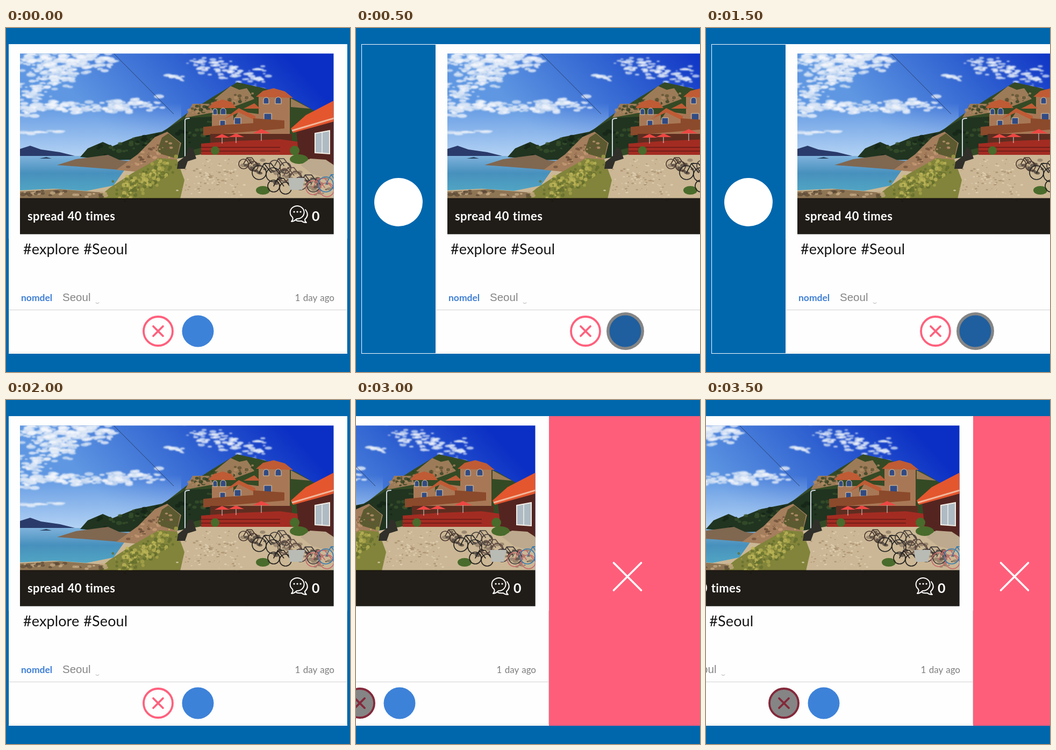
An HTML page for the animation above (4 s loop, 640 px wide and 640 px high).

```html
<!DOCTYPE html>
<html lang="en">
<head>
<meta charset="utf-8">
<style>
  html, body { margin: 0; width: 100%; height: 100%; overflow: hidden; background: #0067ad; }
  svg { display: block; width: 640px; height: 640px; }
  text { font-family: Lato, sans-serif; }
  .bold { font-weight: 700; }
  .line { fill: none; stroke-linecap: round; stroke-linejoin: round; }
</style>
</head>
<body>
<svg viewBox="0 0 640 640">
  <defs>
    <linearGradient id="sky" gradientUnits="userSpaceOnUse" x1="520" y1="50" x2="270" y2="280">
      <stop offset="0" stop-color="#0b2fc4"/>
      <stop offset=".5" stop-color="#3467d2"/>
      <stop offset="1" stop-color="#5f97e2"/>
    </linearGradient>
    <linearGradient id="haze" x2="0" y2="1">
      <stop offset="0" stop-color="#b4d3f4" stop-opacity="0"/>
      <stop offset="1" stop-color="#b4d3f4"/>
    </linearGradient>
    <linearGradient id="sea" x2="0" y2="1">
      <stop offset="0" stop-color="#7fb2dc"/>
      <stop offset=".4" stop-color="#4790bd"/>
      <stop offset="1" stop-color="#55aec6"/>
    </linearGradient>
    <clipPath id="frame"><rect x="26" y="47.5" width="583.5" height="336"/></clipPath>
    <filter id="soft"><feGaussianBlur stdDeviation="1.2"/></filter>
  </defs>

  <rect id="spreadPanel" x="10.5" y="30.5" height="575" fill="#0067ad" stroke="#fff"/>
  <circle id="spreadMark" cy="324" r="45" fill="#fff"/>

  <g id="card">
    <rect x="5" y="30" width="630" height="576" fill="#fdfefd"/>
    <g clip-path="url(#frame)">
      <rect x="26" y="47" width="584" height="337" fill="url(#sky)"/>
      <rect x="26" y="140" width="300" height="100" fill="url(#haze)"/>
      <g id="clouds" filter="url(#soft)"></g>
      <path d="M201 48L312 160" stroke="#26324e" stroke-width=".8"/>
      <path d="M26 240V225L45 219 65 226 100 231 132 239Z" fill="#2a3b6b"/>
      <rect x="26" y="238" width="230" height="80" fill="url(#sea)"/>
      <path d="M62 243L75 240 85 243Z" fill="#2c4560"/>
      <path d="M290 195L335 160 385 128 430 101 480 112 540 134 575 155V240H290Z" fill="#344a25"/>
      <path d="M333 167L347 141 378 141 386 157ZM388 132L418 108 434 115 448 112 462 132 425 146ZM530 131L566 150 530 147Z" fill="#9c7b58"/>
      <g id="hill"></g>
      <path d="M138 240L152 224 180 212 198 220 240 203 290 193 335 167 384 165V218L350 226 335 242 200 246Z" fill="#203420"/>
      <g id="trees"></g>
      <path d="M95 255L130 244 190 236 212 246 232 248 226 265 150 259Z" fill="#806750"/>
      <path d="M26 302L90 299 150 303 200 293 222 262 335 240 370 234 545 236 610 250V384H26Z" fill="#cbb795"/>
      <path d="M205 264L245 235 277 203 300 193 326 214 318 246 250 268Z" fill="#a57e5d"/>
      <path d="M280 232L290 204 302 196 324 214 318 243Z" fill="#5c5a30"/>
      <g id="cliff"></g>
      <path d="M26 304L100 300 180 306V318H26Z" fill="#8e7554"/>
      <path d="M168 318L192 298 235 270 285 242 318 245 332 283 324 318Z" fill="#81843a"/>
      <g id="grass"></g>
      <g id="gravel"></g>

      <path d="M383 160H423V172L433 155 470 160V128H528V215H383Z" fill="#a87856"/>
      <path d="M376 149L386 138 403 133 420 138 428 149ZM405 170L433 149 464 164 464 172 433 157ZM442 150L462 140 473 150ZM465 128L478 117 498 112 519 118 534 130Z" fill="#bf5b35"/>
      <g fill="#314b83" stroke="#dbc8ad" stroke-width="1">
        <path d="M385 161V154a4 4 0 0 1 8 0v7ZM399 161V154a5 5 0 0 1 10 0v7ZM479 141V134a5 5 0 0 1 10 0v7ZM501 141V134a5 5 0 0 1 11 0v7Z"/>
        <path d="M480 159h14v14h-14ZM425 167h12v12h-12ZM398 172h10v10h-10Z"/>
      </g>
      <path d="M367 184L410 180 460 177 460 168 518 172V187L367 200Z" fill="#8b4a2b"/>
      <path d="M380 197H532V216H380Z" fill="#5e2d20"/>
      <path d="M363 215L430 210 510 207 546 212V236H363Z" fill="#a32c22"/>
      <path d="M363 222H510M363 229H510" stroke="#651b18" stroke-width="1.5"/>
      <path d="M388 204L402 197 416 204ZM414 203L428 196 443 203ZM459 196L475 188 492 196Z" fill="#ed4743"/>
      <path d="M402 204V215M428 203V214M475 196V210" stroke="#ddd" stroke-width="1"/>
      <path d="M540 190L610 170V256L545 240Z" fill="#542520"/>
      <path d="M530 187L558 162 610 135V174L534 195Z" fill="#e4562e"/>
      <path d="M532 191L610 168" stroke="#f1b79b" stroke-width="3"/>
      <path d="M575 196L602 191V234L575 232Z" fill="#aebbc4" stroke="#f4eee6" stroke-width="2"/>
      <path d="M588 193V233" stroke="#f4eee6" stroke-width="1.5"/>
      <g fill="#496b2b">
        <circle cx="389" cy="228" r="8"/><circle cx="537" cy="228" r="9"/>
        <ellipse cx="545" cy="244" rx="17" ry="9"/><ellipse cx="478" cy="302" rx="13" ry="8"/>
      </g>
      <path d="M548 255L566 243 595 245 610 255V282L570 272Z" fill="#bda98d"/>
      <g id="bikes" class="line" stroke-width="1.7"></g>
      <path d="M525 279H556L551 301H528Z" fill="#b9bbb5"/>
      <path d="M333 238V172q0-4 8-4" class="line" stroke="#cfd8df" stroke-width="2"/>
      <path d="M318 262L320 249 334 238 340 222 348 224 354 243 338 248 333 262Z" fill="#302f2a"/>
      <rect x="26" y="316.5" width="584" height="68" fill="#0c0a08" fill-opacity=".89"/>
    </g>

    <g fill="#fff" class="bold">
      <text x="40" y="358" font-size="22" letter-spacing=".4" word-spacing="1">spread 40 times</text>
      <text x="569" y="359" font-size="25">0</text>
    </g>
    <g class="line" stroke="#fff" stroke-width="2">
      <path d="M533 352a13 12 0 1 1 8 3q-5 5-10 5q4-4 2-8Z"/>
      <path d="M557 338q8 10-1 18q0 4 3 6q-6 0-9-3q-6 1-10-1"/>
      <path d="M536 342h.1M542 342h.1M548 342h.1" stroke-width="3.2"/>
    </g>

    <text x="32" y="421" font-size="27" letter-spacing=".1" word-spacing="1" fill="#151515">#explore #Seoul</text>
    <text x="28" y="508" font-size="17.5" class="bold" fill="#3f7fd6">nomdel</text>
    <text x="105" y="508" font-size="20.5" fill="#858585" style="font-family:'Liberation Sans',sans-serif">Seoul</text>
    <path d="M167 511q3 3 6 0" class="line" stroke="#aaa"/>
    <text x="611" y="508" font-size="17" word-spacing="1" text-anchor="end" fill="#7d7d7d">1 day ago</text>
    <path d="M5 524.5H635" stroke="#d0d2d2"/>
    <path d="M5 603.5H635" stroke="#e4e6e6"/>
    <path d="M5.5 392V604M634.5 392V604" stroke="#d5d9dc"/>

    <g id="close" class="line" stroke-width="3.8">
      <circle cx="283" cy="564" r="27"/>
      <path d="M274 555l18 18m0-18l-18 18"/>
    </g>
    <circle id="shade" cx="357" cy="564" r="35" fill="#858585"/>
    <circle id="spread" cx="357" cy="564" r="29.5"/>
  </g>

  <rect id="closePanel" y="30" height="576" fill="#ff5e7a"/>
  <path id="closeMark" d="M-25.5-25.5l51 51m0-51l-51 51" class="line" stroke="#fff" stroke-width="3.6"/>
</svg>
<script>
const $ = id => document.getElementById(id);

function add(parent, tag, attributes) {
  const node = document.createElementNS("http://www.w3.org/2000/svg", tag);
  for (const name in attributes) node.setAttribute(name, attributes[name]);
  $(parent).append(node);
}

let seed = 7;
const random = () => (seed = seed * 16807 % 2147483647) / 2147483647;
const spreadOut = size => (random() + random() - 1) * size;

// Small ellipses strewn along a line
function strew(parent, count, [x1, y1, x2, y2], spread, size, colors, flat = .4) {
  for (let i = 0; i < count; i++) {
    const t = random(), r = size * (.4 + random());
    add(parent, "ellipse", {
      cx: x1 + (x2 - x1) * t + spreadOut(spread),
      cy: y1 + (y2 - y1) * t + spreadOut(spread),
      rx: r, ry: r * flat,
      fill: colors[i % colors.length], "fill-opacity": .75
    });
  }
}

const white = ["#f4f7fc", "#d9e5f6"];
strew("clouds", 200, [26, 62, 190, 56], 28, 7, white);
strew("clouds", 140, [26, 130, 120, 75], 30, 6, white);
strew("clouds", 110, [95, 148, 285, 141], 15, 7, white);
strew("clouds", 50, [26, 158, 100, 138], 12, 7, white);
strew("clouds", 110, [340, 60, 485, 97], 22, 5, white);
strew("clouds", 18, [300, 88, 335, 96], 6, 5, white);
strew("clouds", 22, [30, 195, 110, 193], 4, 8, white, .2);
strew("hill", 60, [345, 155, 470, 122], 12, 3, ["#2c3f20", "#b08c66", "#5a5030"], .8);
strew("trees", 60, [170, 230, 375, 190], 18, 4, ["#152417", "#38512b"], .7);
strew("cliff", 50, [235, 255, 305, 215], 14, 3, ["#c49a74", "#6f5138"], .6);
strew("grass", 170, [215, 305, 305, 255], 24, 3, ["#a9a54a", "#636e2c", "#c1b85a"], 1);
strew("gravel", 130, [345, 275, 440, 285], 45, 2, ["#a98f6e", "#e2d3b7"], .6);
strew("gravel", 40, [30, 307, 190, 310], 6, 4, ["#c4a883", "#5f4c38"], .6);
strew("gravel", 90, [450, 255, 600, 300], 18, 4, ["#4b4038", "#8d7a66"], .6);

function bike(x, y, r, color) {
  const gap = r * 2;
  add("bikes", "path", {
    stroke: color,
    d: `M${x - r} ${y}a${r} ${r} 0 1 0 ${2 * r} 0a${r} ${r} 0 1 0 ${-2 * r} 0` +
       `m${gap} 4a${r} ${r} 0 1 0 ${2 * r} 0a${r} ${r} 0 1 0 ${-2 * r} 0` +
       `M${x} ${y}l${r * .7} ${-r * 1.3}h${r}L${x + gap + r} ${y + 4}M${x + r * .7} ${y - r * 1.3}l${r} ${r * 1.3}`
  });
}
bike(442, 253, 9, "#4b3931");
bike(471, 269, 13, "#252525");
bike(500, 256, 10, "#49403b");
bike(498, 294, 11, "#282421");
bike(517, 274, 11, "#5e4941");
bike(548, 289, 12, "#3b3538");
bike(571, 297, 13, "#c7696a");
bike(595, 291, 14, "#347bb1");

// The card moves one step per half second: out to the right and back, then to the left
const steps = [0, 1, 2, 1, 0, -1, -2, -1];

function draw(now) {
  const step = steps[Math.floor(now % 4000 / 500)];
  const right = step > 0, left = step < 0;
  const offset = step * (right ? 144 : 138);
  const show = (id, on) => $(id).setAttribute("visibility", on ? "visible" : "hidden");

  $("card").setAttribute("transform", `translate(${offset})`);
  show("spreadPanel", right);
  show("spreadMark", right);
  show("shade", right);
  show("closePanel", left);
  show("closeMark", left);

  $("spreadPanel").setAttribute("width", Math.max(0, offset - 6));
  $("spreadMark").setAttribute("cx", 7 + offset / 2);
  $("closePanel").setAttribute("x", 635 + offset);
  $("closePanel").setAttribute("width", Math.max(0, 5 - offset));
  $("closeMark").setAttribute("transform", `translate(${643 + offset / 2} 328.5)`);
  $("spread").style.fill = right ? "#1f5f9f" : "#3d82d9";
  $("close").style.stroke = left ? "#84283a" : "#ff607d";
  $("close").style.fill = left ? "#858585" : "none";
  requestAnimationFrame(draw);
}
draw(performance.now());
</script>
</body>
</html>
```
